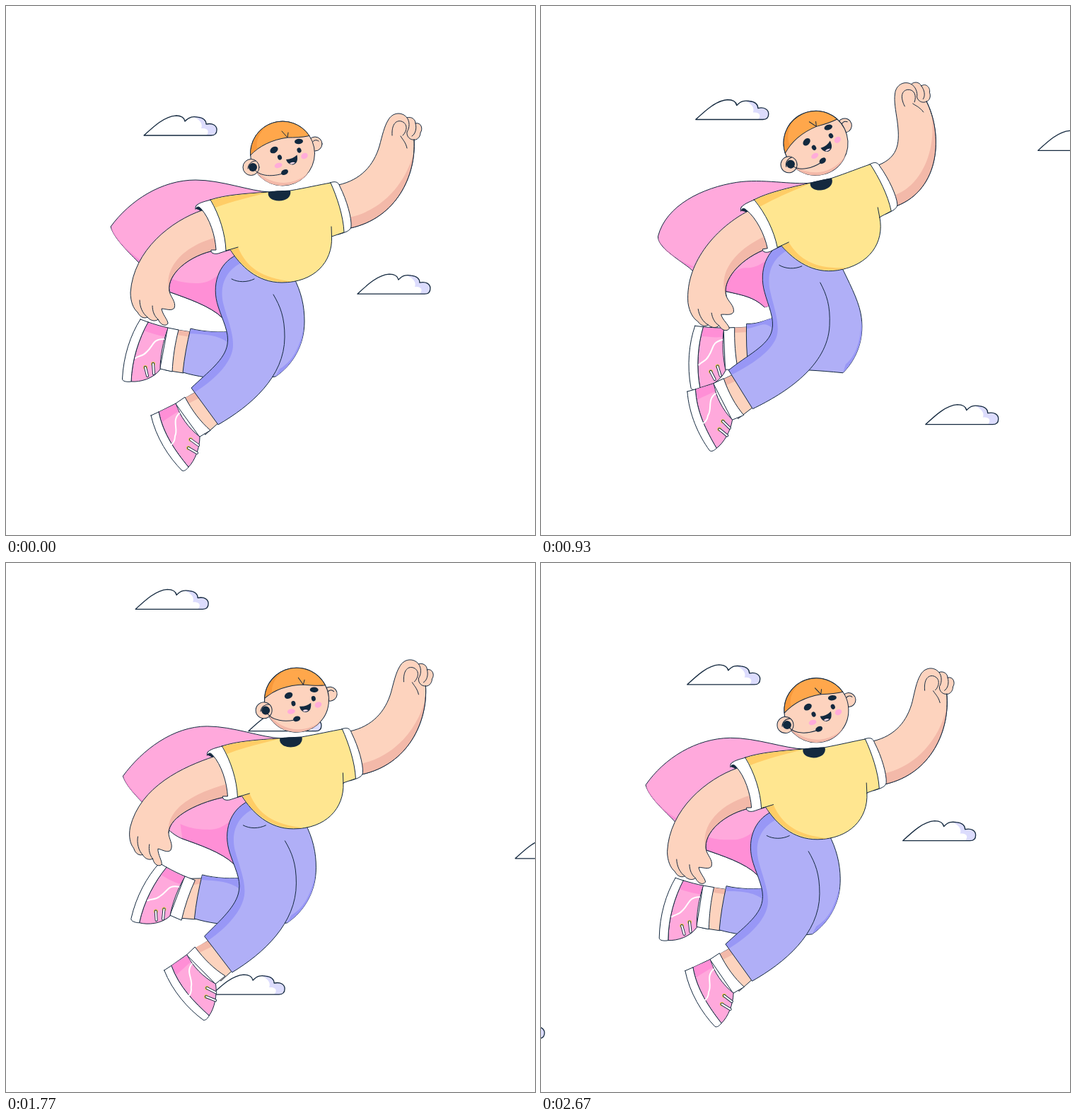
Write an HTML page that moves like this. It is 748 px wide and 748 px high and loops after 2700 ms.

```html
<!DOCTYPE html>
<html lang="en">
<head>
<meta charset="utf-8">
<title>Flying hero</title>
<style>
  html, body { margin: 0; width: 100%; height: 100%; overflow: hidden; background: #fff; }
  svg { display: block; width: 748px; height: 748px; }
  path, circle, ellipse { stroke-linecap: round; stroke-linejoin: round; }
</style>
</head>
<body>
<svg viewBox="0 0 748 748" xmlns="http://www.w3.org/2000/svg">
  <defs>
    <path id="puff" d="M0 0C14-13 29-27 45-28C53-28 57-25 58-20C64-27 70-27 76-26C84-25 88-22 88-16C97-18 103-14 103-8C103-3 100 0 95 0Z"/>
    <g id="cloud">
      <use href="#puff" fill="#fff"/>
      <path fill="#dcdcfd" d="M70-26C82-28 88-23 88-16C97-18 103-14 103-8C103-3 100 0 95 0H88C93-5 91-11 81-10C84-17 78-23 70-26Z"/>
      <use href="#puff" fill="none" stroke="#14293f" stroke-width="1.3"/>
    </g>
  </defs>
  <g id="sky"></g>
  <g id="body"></g>
  <g id="head" stroke="#14293f" fill="#fdd3be">
    <circle cx="437" cy="195" r="10"/>
    <path fill="none" d="M432 196C433 190 438 188 442 191"/>
    <circle cx="391" cy="208.5" r="45.5"/>
    <path stroke="none" fill="#f3b9a9" d="M347.500 222A45.500 45.500 0 0 0 428 235A50 50 0 0 1 347.500 222Z"/>
    <path fill="#ffa74b" d="M345.600 211A45.500 45.500 0 0 1 429 183.500C418 186 408 186 398 186C376 189 358 198 345.600 211Z"/>
    <path stroke="none" fill="#f9983a" d="M346.500 209A45 45 0 0 1 370 169C358 178 353 190 355 202Z"/>
    <path fill="none" d="M390 177L398 186L399 179"/>
    <circle cx="346.500" cy="228" r="11.500"/>
    <path fill="none" d="M353 219C347 219 342 224 342 230M351 231C360 242 378 241 391 237"/>
    <g stroke="none" fill="#12293f">
      <circle cx="349" cy="228" r="6"/>
      <ellipse cx="394" cy="235" rx="5.200" ry="3.700" transform="rotate(-25 394 235)"/>
      <ellipse cx="379" cy="203.500" rx="6" ry="4.300" transform="rotate(-32 379 203.500)"/>
      <ellipse cx="414" cy="191.500" rx="6" ry="3.700" transform="rotate(-5 414 191.500)"/>
      <ellipse cx="387" cy="214" rx="3" ry="3.700" transform="rotate(-18 387 214)"/>
      <ellipse cx="414.500" cy="204" rx="3" ry="3.700" transform="rotate(-18 414.500 204)"/>
      <path d="M396 217Q405 217 411.500 210.500Q414 223 405 224.500Q398 224 396 217Z"/>
      <path fill="#f7d9e6" d="M401 222.500Q405 219.500 409 221.500Q406 224 403 223.700Z"/>
      <ellipse fill="#ffacd9" cx="385" cy="225.500" rx="5.500" ry="3.500" transform="rotate(-15 385 225)"/>
      <ellipse fill="#ffacd9" cx="422" cy="212" rx="5" ry="4" transform="rotate(-30 422 212)"/>
    </g>
  </g>
</svg>
<script>
const NS = 'http://www.w3.org/2000/svg', LOOP = 2700, CYCLE = 1350, STEP = 30;
const INK = '#14293f', SKIN = '#fdd3be', SKIN2 = '#f3b9a9', PINK = '#ffa9dc', PINK2 = '#ff8fd6',
  BLUE = '#b0aff7', BLUE2 = '#9897f6', SUN = '#ffe690', SUN2 = '#ffcd66', WHITE = '#fff';
const $ = id => document.getElementById(id);
const cosd = deg => Math.cos(deg * Math.PI / 180);

// Joints swing like pendulums: parent, pivot, amplitude and phase in degrees
const JOINTS = {
  t: ['r', 386, 266, 5.8, 56],    // torso
  h: ['t', 390, 242, 6.6, 90],    // head
  b: ['t', 508, 282, 9.5, 56],    // raised forearm
  a: ['t', 260, 299, 6.2, 130],   // lowered forearm
  p: ['r', 421, 557, -1.7, 56],   // hips
  q: ['p', 440, 385, 9, 56],      // back thigh
  m: ['r', 391, 446, -3.2, 70],   // front cuff
  s: ['m', 265, 590, -6.5, 100],  // front foot
  n: ['r', 310, 369, 8, 56],      // back cuff
  k: ['n', 215, 500, 6.8, 120],   // back foot
  c: ['t', 386, 266, -1.6, 80],   // cape tip
  v: ['c', 148, 312, 15, 240],    // lower cape bulge
  w: ['c', 148, 312, -10, 240],   // upper cape bulge
  g: ['r', 386, 266, 3, 56]       // cape hem
};
function solve(t) {
  const turn = t / CYCLE * 360;
  const pose = { r: new DOMMatrix().translate(9.6 - 10.2 * cosd(turn + 20), 11 * cosd(turn) - 11) };
  for (const id in JOINTS) {
    const [parent, x, y, amp, phase] = JOINTS[id];
    const angle = amp * (cosd(turn - phase) - cosd(phase));
    pose[id] = pose[parent].translate(x, y).rotate(angle).translate(-x, -y);
  }
  return pose;
}

// Paths: a lowercase letter picks the joint that carries the points after it
const parts = [];
function add(fill, d, stroke = INK, width = 1) {
  const el = document.createElementNS(NS, 'path');
  el.setAttribute('fill', fill);
  el.setAttribute('stroke', stroke);
  el.setAttribute('stroke-width', width);
  $('body').append(el);
  parts.push({ el, tokens: d.match(/[A-Za-z]|-?[\d.]+/g) });
}
const shade = (fill, d) => add(fill, d, 'none');
const line = (d, color, width) => add('none', d, color, width);
function lace(joint, x1, y1, x2, y2) {
  const d = `${joint} M${x1},${y1} L${x2},${y2}`;
  line(`${joint} M${x1},${y1} L${x1},${y1}`, '#e9c84e', 6);
  line(d, INK, 4);
  line(d, WHITE, 2.2);
}

// Cape
const hem = 'g233,405 C g255,413 r289,424 r306,441';
add(PINK, `M t372,263 C t345,262 t305,246 t268,246 C t220,246 w175,275 c148,312
  C v152,327 c170,345 c187,362 C c200,378 g218,400 ${hem} L p322,440 p345,355 t345,320 Z`);
shade(PINK2, 'M c148.5,313 C v152,327 c170,345 c187,361 L c195,362 C c172,348 v158,332 c148.5,313 Z');
shade(PINK2, `M ${hem} L p324,440 p324,354 C p306,378 p290,392 p272,392 C p258,392 g245,391 g230,384 Z`);
line(`M ${hem}`);

// Back foot
add(SKIN, 'M k236,457 L n262,461 n251,519 k226,515 Z');
shade(SKIN2, 'M k243,458 L n262,461 n261,468 k242,465 Z');
add(WHITE, 'k M229,455 L244,458 C239,477 236,497 235,517 L218,513 Z');
add(PINK, 'k M201,447 C210,450 220,453 229,455 C222,475 218,495 218,514 C208,527 190,532 177,531 C178,500 188,470 201,447 Z');
shade(PINK2, 'k M201,448 C210,451 220,454 228,456 L224,467 C214,466 204,462 195,459 Z');
add(WHITE, 'k M190,443 L201,447 C188,470 178,500 177,531 C172,532 164,531 164.5,527 C166,495 176,465 190,443 Z');
line('k M223,471 C207,471 209,480 199,489 C193,496 188,494 183,498', WHITE, 2);
lace('k', 197, 511, 200, 523);
lace('k', 208, 506, 209, 520);

// Back leg
add(BLUE, `M p350,372 L p406,382 C p418,405 q422,425 q422,446 C q422,480 q405,508 q381,524
  C p340,530 n290,530 n250,518 C n252,498 n256,476 n261,456 C n280,461 p305,462 p320,460 Z`);
shade(BLUE2, 'M n261,457 C n280,461 p305,462 p318,460 L p314,476 C p300,465 n280,464 n260,463 Z');
shade(BLUE2, 'M q421,455 C q420,482 q405,508 q381,524 L q387,513 C q403,504 q414,487 q421,455 Z');

// Front foot
add(SKIN, 'M s247,558 L m268,546 m302,588 s282,606 Z');
shade(SKIN2, 'M s253,554 L m268,546 m274,554 s258,562 Z');
add(WHITE, 's M240,562 L253,553 C263,572 275,588 289,600 L274,609 Z');
add(PINK, 's M216,574 C224,570 232,566 240,562 C246,580 258,597 274,609 C274,625 267,643 258,652 C240,630 222,605 216,574 Z');
shade(PINK2, 's M216.500,574 C224,570 232,567 239.500,563 L244,573 C236,578 228,583 221,588 Z');
add(WHITE, 's M205,579 L216,574 C222,605 240,630 258,652 C255,656 252,658 249,657 C230,638 212,610 205,579 Z');
line('s M245,576 C234,586 244,598 239,608 C239,615 237,619 231,622', WHITE, 2);
lace('s', 261, 613, 272, 621);
lace('s', 258, 625, 270, 632);

// Front leg
const shin = 'M p326,352 C p300,364 p290,395 p300,425 C p306,444 p316,462 p313,478 C p310,500 m285,518 m262,540';
const calf = 'm300,592 C m345,566 p394,525 p394,468 C p394,440 p388,425 p378,408';
shade(BLUE, `${shin} L ${calf} L p406,380 Z`);
shade(BLUE2, `${shin} L m267,546 C m290,532 p322,505 p321,478 C p321,460 p312,440 p307,420 C p301,392 p313,368 p345,358 Z`);
line(`${shin} L ${calf}`);
line('p M319,386 C328,391 341,391 351,386');

// Raised arm
const underArm = 'b577,189 C b580,240 t552,300 t487,314';
add(SKIN, `M t470,253 C t502,246 b520,225 b528,198 C b532,183 b535,170 b540,162 C b546,150 b560,149 b567,158
  C b573,156 b579,160 b579,166 C b587,164 b590,174 b586,179 C b586,186 b580,190 ${underArm} Z`);
shade(SKIN2, `M ${underArm} L t485,299 C t530,290 b566,252 b577,205 Z`);
line(`M ${underArm}`);
line('b M546,183 C545,168 551,161 559,163 C568,166 568,176 561,183 M558,184 C560,188 565,192 567,201');
line('b M567,158 C571,163 571,172 567,178 C566,185 572,190 577,189 M579,166 C581,173 579,181 574,184');

// Lowered arm
shade(INK, 't M276,279 C266,280 266,287 272,288 L284,296 L302,344 L290,345 C289,350 294,351 300,349 L310,340 Z');
const inner = 'a231,403 C a227,380 t258,352 t298,345';
add(SKIN, `M t277,289 C t235,303 a180,345 a176,405 C a176,418 a180,428 a186,433 C a190,441 a196,442 a200,440
  C a205,446 a212,446 a215,443 C a219,452 a226,453 a229,449 C a229,444 a221,436 a220,428
  C a226,428 a234,432 a238,427 C a241,418 a232,411 ${inner} L t302,300 Z`);
shade(SKIN2, `M ${inner} L t294,328 C t255,339 a224,366 a230,400 Z`);
line(`M ${inner}`);
line('a M189,416 C189,425 193,435 200,440 M207,424 C207,432 210,439 215,443');

// Shirt
add(WHITE, `t M268,287 C267,281 273,278 290,274 L330,290 L328,341 L303,349 C296,352 289,350 290,345
  L297,345 C296,325 288,300 276,287 C273,283 270,283 268,287 Z`);
add(WHITE, 't M458,250 C466,247 470,249 472,255 C482,275 489,300 488,312 C487,318 480,320 470,323 Z');
add(SUN, `t M289,274 C310,267 340,265 371,263 L402,261 C425,257 442,253 459,250
  C468,270 477,297 478,320 L460.500,326 C462,362 436,391 390,391 C355,391 332,368 317,344.500
  L311,346 C310,322 302,296 289,274 Z`);
shade(SUN2, 't M290,274.500 C310,268 340,265.500 371,263.700 C345,270 320,276 296,285 Z');
shade(SUN2, 't M318,344.500 L328,341 C340,370 362,385 404,389.500 C362,394 334,370 318,344.500 Z');
line('t M460,312 L460.500,327 M311,346 L328,341');
shade(INK, 't M371,263 C376,261 396,261 402,261 C404,270 396,275.500 386,275.500 C376,275.500 369,270 371,263 Z');

// Clouds enter at the top edge of a lane and drift down to the left
const SLOW = { vx: -.389, vy: .369 }, FAST = { vx: -.49, vy: .483 };
const lanes = [
  { x: 388, drift: SLOW, starts: [495, 2204] },
  { x: 252, drift: SLOW, starts: [1593] },
  { x: 910, drift: FAST, starts: [507, 1857] },
  { x: 1144, drift: FAST, starts: [905, 2405] },
  { x: 584, drift: FAST, starts: [1278] }
];
const clouds = lanes.flatMap(({ x, drift, starts }) => starts.map(start => {
  const el = document.createElementNS(NS, 'use');
  el.setAttribute('href', '#cloud');
  $('sky').append(el);
  return { el, x, start, ...drift };
}));

function draw(t) {
  for (const c of clouds) {
    const age = (t - c.start + LOOP) % LOOP;
    c.el.setAttribute('transform', `translate(${c.x + c.vx * age} ${c.vy * age})`);
  }
  const pose = solve(t);
  for (const { el, tokens } of parts) {
    let d = '', m;
    for (let i = 0; i < tokens.length; i++) {
      const tok = tokens[i];
      if (/[A-Z]/.test(tok)) d += tok;
      else if (/[a-z]/.test(tok)) m = pose[tok];
      else {
        const x = +tok, y = +tokens[++i];
        d += `${(m.a * x + m.c * y + m.e).toFixed(2)} ${(m.b * x + m.d * y + m.f).toFixed(2)} `;
      }
    }
    el.setAttribute('d', d);
  }
  $('head').setAttribute('transform', pose.h.toString());
}

const start = performance.now();
function tick() {
  const t = (performance.now() - start) % LOOP;
  draw(Math.floor(t / STEP) * STEP);
  requestAnimationFrame(tick);
}
tick();
</script>
</body>
</html>
```
